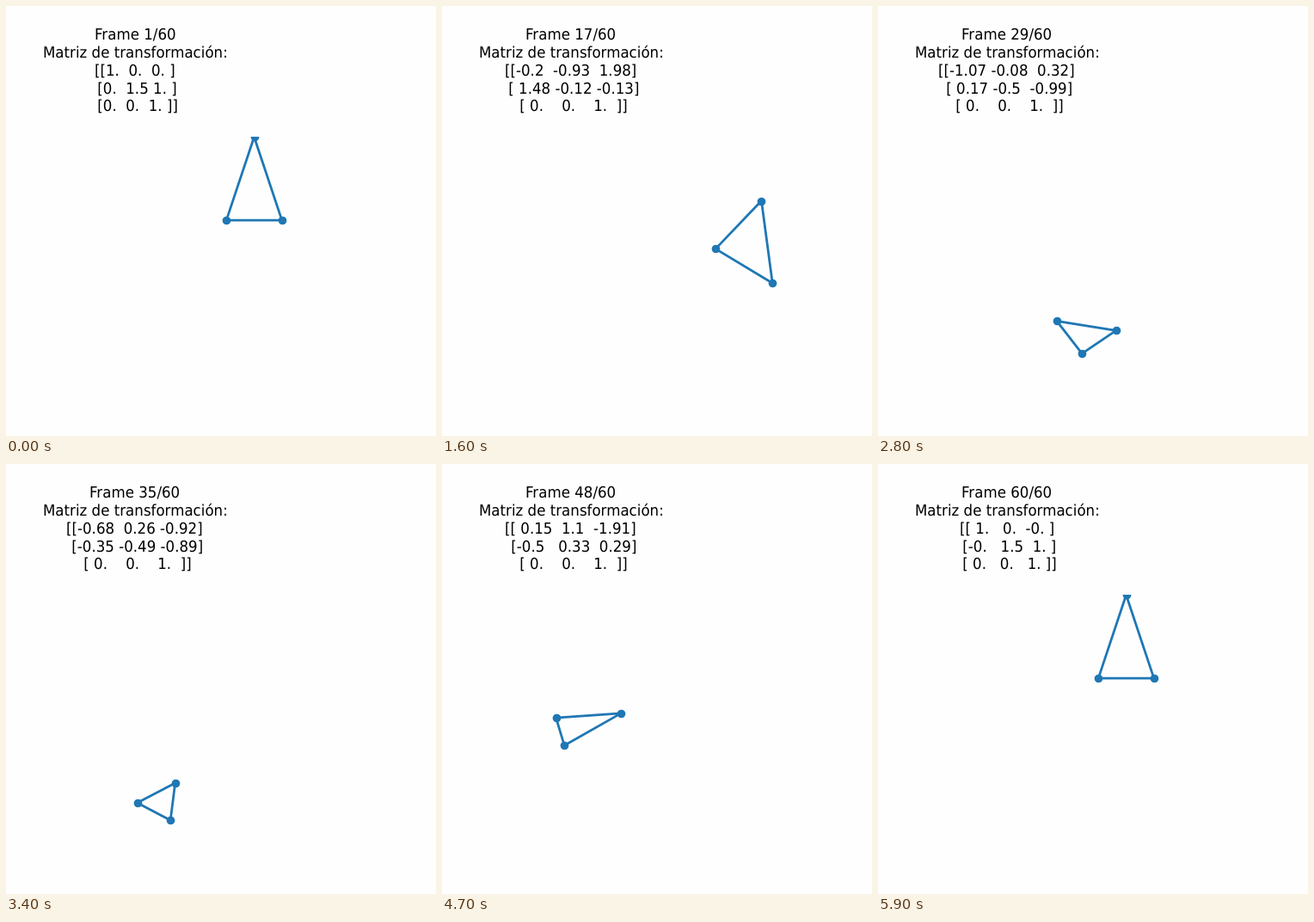
Write an HTML page with a canvas that moves like this. It is 500x500 px and loops after 6000 ms.

```html
<!DOCTYPE html>
<html lang="es">
<head>
<meta charset="utf-8">
<style>
  html, body { margin: 0; height: 100%; overflow: hidden; background: #fefefe; }
  canvas { display: block; }
</style>
</head>
<body>
<canvas id="stage" width="500" height="500"></canvas>
<script>
const ctx = document.getElementById('stage').getContext('2d');
const STEPS = 60, STEP_MS = 100;
const UNIT = 387.5 / 6, ORIGIN = [256.25, 313.7], AXES_TOP = 152;
const TRIANGLE = [[0, 0], [1, 0], [0.5, 1]];
const GLYPH_RISE = 1.07; // hinted glyphs stand slightly taller than their outlines

// Translation * rotation * scale; adding 0 turns -0 into 0.
function matrixAt(step) {
  const angle = 2 * Math.PI * step / (STEPS - 1);
  const c = Math.cos(angle), s = Math.sin(angle);
  const sx = 1 + 0.5 * s, sy = 1 + 0.5 * c;
  return [[c * sx, -s * sy + 0, 2 * s], [s * sx, c * sy, c], [0, 0, 1]];
}

// NumPy-style layout: two decimals, points aligned across the whole array.
function formatMatrix(matrix) {
  const cells = matrix.map(row => row.map(value => {
    const v = Math.round(value * 100) / 100;
    const [whole, decimals = ''] = String(Math.abs(v)).split('.');
    return [(v < 0 || Object.is(v, -0) ? '-' : '') + whole, decimals];
  }));
  const widest = part => Math.max(...cells.flat().map(cell => cell[part].length));
  const left = widest(0), right = widest(1);
  return cells.map((row, i) => (i ? ' [' : '[[') +
    row.map(([whole, decimals]) => whole.padStart(left) + '.' + decimals.padEnd(right)).join(' ') +
    (i === 2 ? ']]' : ']'));
}

function drawText(lines) {
  ctx.save();
  ctx.scale(1, GLYPH_RISE);
  ctx.font = '16.667px "DejaVu Sans", sans-serif';
  ctx.textRendering = 'geometricPrecision';
  ctx.fillStyle = '#000';
  lines.forEach((line, i) => {
    const box = ctx.measureText(line);
    const inkLeft = line[0] === ' ' ? 0 : -box.actualBoundingBoxLeft;
    const inkWidth = box.actualBoundingBoxRight - inkLeft;
    const baseline = Math.round(39.2 + 20.8 * i);
    ctx.fillText(line, Math.round(150 - inkWidth / 2) - inkLeft, baseline / GLYPH_RISE);
  });
  ctx.restore();
}

function drawTriangle([[a, b, tx], [c, d, ty]]) {
  const points = TRIANGLE.map(([x, y]) => [
    ORIGIN[0] + UNIT * (a * x + b * y + tx),
    ORIGIN[1] - UNIT * (c * x + d * y + ty)
  ]);
  ctx.save();
  ctx.beginPath();
  ctx.rect(0, AXES_TOP, 500, 500 - AXES_TOP);
  ctx.clip();
  ctx.strokeStyle = ctx.fillStyle = '#1f77b4';
  ctx.lineWidth = 2.78;
  ctx.lineJoin = 'round';
  ctx.beginPath();
  points.forEach(p => ctx.lineTo(...p));
  ctx.closePath();
  ctx.stroke();
  // Markers sit on pixel centres.
  for (const [x, y] of points) {
    ctx.beginPath();
    ctx.arc(Math.round(x) + 0.5, Math.round(y) + 0.5, 4.86, 0, 2 * Math.PI);
    ctx.fill();
  }
  ctx.restore();
}

function draw() {
  const step = Math.floor(performance.now() / STEP_MS) % STEPS;
  const matrix = matrixAt(step);
  ctx.fillStyle = '#fefefe';
  ctx.fillRect(0, 0, 500, 500);
  drawText([`Frame ${step + 1}/${STEPS}`, 'Matriz de transformación:', ...formatMatrix(matrix)]);
  drawTriangle(matrix);
  requestAnimationFrame(draw);
}
draw();
</script>
</body>
</html>
```
